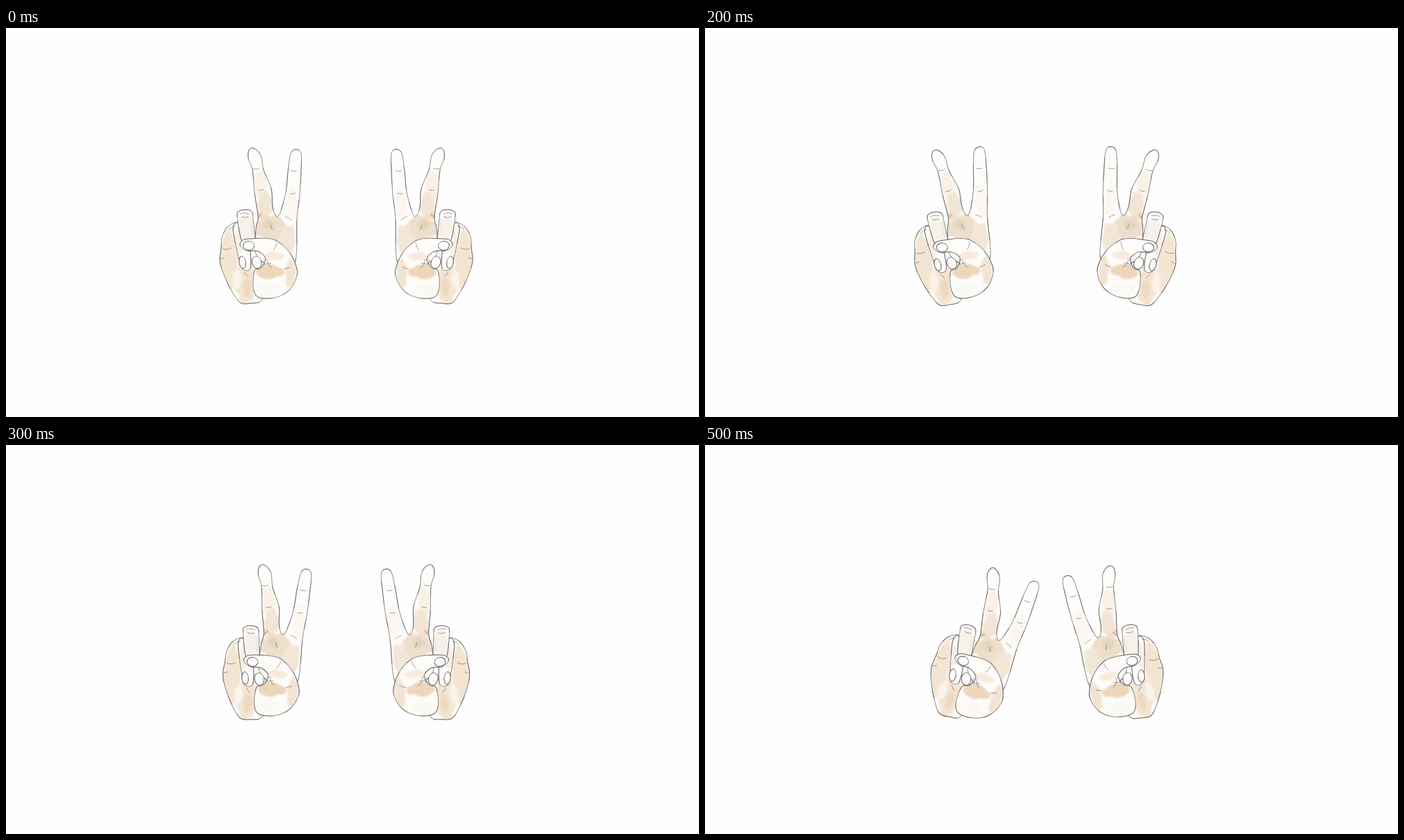
Animation, 998 px wide and 561 px high, one loop 600 ms. Source, as an HTML page with a canvas:

```html
<!DOCTYPE html>
<html lang="en">
<head>
<meta charset="utf-8">
<title>Peace hands</title>
<style>
  html, body { margin: 0; width: 100%; height: 100%; overflow: hidden; background: #fefefe; }
  canvas { display: block; width: 998px; height: 561px; }
</style>
</head>
<body>
<canvas width="998" height="561"></canvas>
<script>
const ctx = document.querySelector('canvas').getContext('2d');

let seed = 7;
const random = () => (seed = seed * 16807 % 2147483647) / 2147483647;

// Closed smooth path through points
function smooth(pts) {
  const n = pts.length, path = new Path2D();
  const at = i => pts[(i + n) % n];
  path.moveTo(...pts[0]);
  for (let i = 0; i < n; i++) {
    const [a, b, c, d] = [at(i - 1), at(i), at(i + 1), at(i + 2)];
    path.bezierCurveTo(b[0] + (c[0] - a[0]) / 6, b[1] + (c[1] - a[1]) / 6,
                       c[0] - (d[0] - b[0]) / 6, c[1] - (d[1] - b[1]) / 6, ...c);
  }
  return path;
}
const outline = text => smooth(text.split(' ').map(p => p.split(',').map(Number)));

function oval(x, y, rx, ry, turn = 0) {
  const path = new Path2D();
  path.ellipse(x, y, rx, ry, turn, 0, 7);
  return path;
}

// A patch of watercolour with a ragged edge
function wash(color, x, y, rx, ry) {
  const pts = Array.from({ length: 16 }, (_, i) => {
    const angle = i * Math.PI / 8, reach = 0.85 + 0.3 * random();
    return [x + rx * reach * Math.cos(angle), y + ry * reach * Math.sin(angle)];
  });
  return { color, path: smooth(pts) };
}

// Stacked from back to front
const parts = [
  { // folded little finger and side of the hand
    path: outline('358,310 346,286 333,280 319,287 311,302 310,316 308,332 310,345 319,368 331,389 339,397 352,397 369,391 375,350'),
    washes: [
      wash('#f3e5d2', 322, 338, 13, 44), wash('#f3e5d2', 345, 368, 15, 29),
      wash('#faf3ea', 333, 362, 6, 15), wash('#eed9bf', 347, 374, 6, 13)],
  },
  { // raised fingers and upper palm
    path: outline('363,273 358,238 355,205 349,188 350,176 357,173.5 367,184 371,205 382,232 384,258 389,271 395,266 403,236 406,207 410,181 418,175 425,181 425,205 423,240 419,276 417,335 400,350 362,330 360,290'),
    washes: [
      wash('#f9f1e6', 366, 226, 9, 21), wash('#f3e5d5', 373, 256, 10, 21),
      wash('#fbf6f0', 411, 252, 9, 24), wash('#eddfcb', 380, 289, 22, 19),
      wash('#f2e6d7', 405, 306, 13, 22), wash('#e5d4bd', 378, 284, 8, 7),
      wash('#f0d6b8', 365, 270, 4, 6)],
  },
  { // ring finger
    path: outline('333,281 327,288 330,308 335,331 341,348 352,346 351,318 344,300'),
    washes: [wash('#f6efe6', 337, 308, 6, 20)],
  },
  { path: oval(340.5, 338, 4.7, 9, -0.15), washes: [] },
  { // middle finger
    path: outline('333,272 336,264 346,262 354,265 356,276 358,310 341,310'),
    washes: [wash('#f7f1ea', 346, 288, 10, 18), wash('#eee6dd', 355, 290, 2, 14)],
  },
  { path: oval(361, 338, 6.8, 9, -0.3), washes: [] },
  { // thumb and its base
    path: outline('337,313 341,306 350,304 374,303.5 390,307 407,322 417,341 419,357 408,378 387,389 363,388 356,373 358,350 367,346 374,333 363,322 346,321'),
    washes: [
      wash('#f6ebdd', 386, 329, 14, 6), wash('#f2e4d2', 410, 353, 8, 22),
      wash('#edd6b9', 377, 351, 17, 10), wash('#edd6b9', 391, 352, 9, 6),
      wash('#fcf9f4', 378, 377, 17, 9)],
  },
  { path: oval(349.5, 314, 8, 6.5, 0.1), washes: [] },
];

const creases = new Path2D(`
  M355 203q5 2 10-1 M363 234q4 1 8-1 M410 206q5 1 9 0 M409 239q4 1 8-1
  M402 272q5 1 9 5 M381 284q0 4 3 7 M364 272l5-4 M337 268q6-3 13 0
  M339 272q5 3 11 0 M321 290q4-4 9-4 M312 318q6 3 13-1 M309 333l6-2
  M343 352l6 7 M385 321q4-5 5-11 M372 333q1 8-5 13 M377 333q-2 7 6 13
  M370 341l12-2 M400 348l9-3`);

// Even line plus broken strokes of extra pressure
function pencil(path) {
  ctx.strokeStyle = 'rgba(85,85,88,.66)';
  ctx.lineWidth = 1;
  ctx.stroke(path);
  ctx.setLineDash([34, 21, 13, 17]);
  ctx.strokeStyle = 'rgba(65,65,70,.45)';
  ctx.stroke(path);
  ctx.setLineDash([]);
}

function drawHand() {
  for (const { path, washes } of parts) {
    ctx.fillStyle = '#fefcf9';
    ctx.fill(path);
    ctx.save();
    ctx.clip(path);
    ctx.filter = 'blur(1.3px)';
    for (const w of washes) {
      ctx.fillStyle = w.color;
      ctx.fill(w.path);
    }
    ctx.restore();
    pencil(path);
  }
  ctx.lineWidth = 0.8;
  ctx.strokeStyle = 'rgba(85,78,74,.65)';
  ctx.stroke(creases);
}

// Each pose swings the hands about their wrists
const STEP = 100, LEFT = 370, RIGHT = 610, WRIST_Y = 392;
const poses = [[0, 0], [-2, -2], [-6, -6], [4, 4], [11, 7.8], [16, 11.2]];

function place(x, flip, tilt) {
  ctx.save();
  ctx.translate(x, WRIST_Y);
  ctx.scale(flip, 1);
  ctx.rotate(tilt * Math.PI / 180);
  ctx.translate(-LEFT, -WRIST_Y);
  drawHand();
  ctx.restore();
}

let shown;
function frame() {
  const pose = poses[Math.floor(performance.now() / STEP) % poses.length];
  if (pose !== shown) {
    shown = pose;
    ctx.fillStyle = '#fefefe';
    ctx.fillRect(0, 0, 998, 561);
    place(LEFT, 1, pose[0]);
    place(RIGHT, -1, pose[1]);
  }
  requestAnimationFrame(frame);
}
frame();
</script>
</body>
</html>
```
